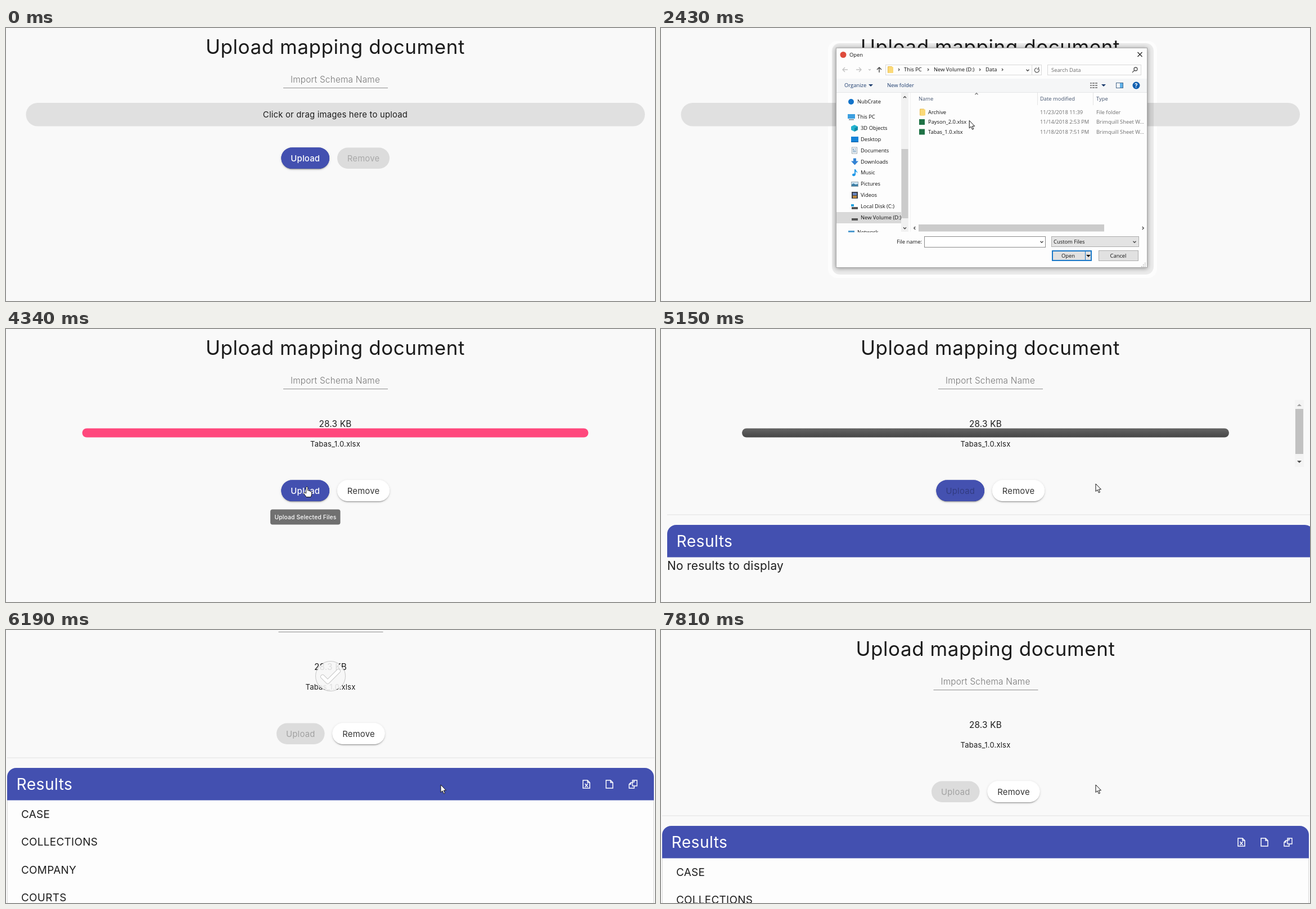
An HTML page with a canvas that plays this animation: 1154x485 px, repeating every 8000 ms.

```html
<!DOCTYPE html>
<html lang="en">
<head>
<meta charset="utf-8">
<title>Upload mapping document</title>
<style>
html, body { margin: 0; width: 100%; height: 100%; overflow: hidden; background: #f9f9f9; }
canvas { display: block; }
</style>
</head>
<body>
<canvas id="stage" width="1154" height="485"></canvas>
<script>
const LOOP = 8000;
const ctx = document.getElementById('stage').getContext('2d');
const BLUE = '#4350b0', GREY = '#dcdcdc', INK = '#1c1c1c';

// Time helpers: a smooth ramp, and one that advances in n visible jumps.
const ramp = (t, a, b) => Math.min(1, Math.max(0, (t - a) / (b - a)));
const steps = (t, a, b, n) => t < a ? 0 : Math.min(1, (Math.floor((t - a) / (b - a) * (n - 1)) + 1) / n);

// Drawing helpers
function fill(d, color) { ctx.fillStyle = color; ctx.fill(new Path2D(d)); }
function stroke(d, color, width = 1) {
  ctx.strokeStyle = color;
  ctx.lineWidth = width;
  ctx.stroke(new Path2D(d));
}
function box(x, y, w, h, color, r = 0) {
  ctx.fillStyle = color;
  ctx.beginPath();
  ctx.roundRect(x, y, w, h, r);
  ctx.fill();
}
function frame(x, y, w, h, color, width = 1) {
  ctx.strokeStyle = color;
  ctx.lineWidth = width;
  ctx.strokeRect(x + .5, y + .5, w - 1, h - 1);
}
function dot(x, y, r, color) { box(x - r, y - r, 2 * r, 2 * r, color, r); }
function text(s, x, y, size, color = INK, weight = 400, align = 'left') {
  ctx.font = `${weight} ${size}px Inter, sans-serif`;
  ctx.letterSpacing = size * .016 + 'px';
  ctx.textAlign = align;
  ctx.fillStyle = color;
  ctx.fillText(s, x, y);
}
// Small dialog label, placed by its vertical middle.
function label(s, x, y, color = '#111', align = 'left') {
  ctx.font = '9.4px "Open Sans", sans-serif';
  ctx.letterSpacing = '0px';
  ctx.textAlign = align;
  ctx.fillStyle = color;
  ctx.fillText(s, x, y + 3.4);
}
function at(x, y, draw) {
  ctx.save();
  ctx.translate(x, y);
  draw();
  ctx.restore();
}
function faded(alpha, draw) {
  ctx.save();
  ctx.globalAlpha *= alpha;
  draw();
  ctx.restore();
}
function raised(blur, dy, color, draw) {
  ctx.save();
  Object.assign(ctx, { shadowBlur: blur, shadowOffsetY: dy, shadowColor: color });
  draw();
  ctx.restore();
}
const chevron = (x, y, turn, color = '#444', size = 2.5) => at(x, y, () => {
  ctx.rotate(turn * Math.PI / 2);
  stroke(`M${-size} ${size / 2}L0 ${-size / 2}L${size} ${size / 2}`, color, 1.3);
});

// Main page
function pill(x, y, w, color, lifted) {
  const draw = () => box(x, y, w, 37.5, color, 18.75);
  if (lifted) {
    raised(5, 1, 'rgba(0,0,0,.12)', draw);
    raised(2, 2, 'rgba(0,0,0,.14)', draw);
    raised(1, 3, 'rgba(0,0,0,.2)', () => box(x + 2, y + 2, w - 4, 33.5, color, 16.75));
  }
  draw();
}
const caption = (s, x, y, color, weight) => text(s, x, y + 24, 14.8, color, weight, 'center');

function progressBar(t, cx) {
  const pulse = 1 + .1 * Math.sin(Math.PI * ramp(t, 3480, 4340));
  const w = t < 5150 ? 900 : 866;
  faded(1 - ramp(t, 5150, 5600), () => at(cx, 184.5, () => {
    ctx.scale(pulse, pulse);
    if (t < 5150) box(-w / 2, -8, w, 16, '#ff487d', 8);
    const done = w * ramp(t, 4540, 4850);
    if (done) {
      const shade = ctx.createLinearGradient(0, -8, 0, 8);
      shade.addColorStop(0, '#646464');
      shade.addColorStop(1, '#464646');
      box(-w / 2, -8, done, 16, shade, 8);
    }
  }));
}

function checkMark(t) {
  const enter = ramp(t, 5400, 5890), leave = ramp(t, 7180, 7510);
  faded(enter * (1 - leave), () => at(577, 185 + 40 * (1 - enter - leave), () => {
    const tick = 'M-14 1L-5 10L14 -9';
    dot(0, 0, 27, 'rgba(0,0,0,.2)');
    dot(0, 0, 26, 'rgba(255,255,255,.85)');
    ctx.lineCap = ctx.lineJoin = 'round';
    stroke(tick, '#c8c8c8', 8);
    stroke(tick, '#fff', 6);
  }));
}

function innerScrollbar() {
  box(1127, 126, 16, 119, '#f4f4f4');
  box(1128, 142, 14, 80, '#c1c1c1');
  fill('M1131 137h8l-4-4z', '#a3a3a3');
  fill('M1131 234h8l-4 4z', '#505050');
}

function results(t) {
  const listed = t >= 5980, x = listed ? 2 : 11;
  box(x, 329.5, 1151, 1, '#e2e2e2');
  if (listed) {
    box(2, 400, 1150, 330, '#dcdcdc');
    box(3, 400, 1148, 330, '#fdfdfd');
    ['CASE', 'COLLECTIONS', 'COMPANY', 'COURTS', 'DEBTOR_PAYMENTS', 'DOCUMENTS']
      .forEach((name, i) => text(name, 27, 436.5 + i * 49.6, 18.9));
  } else {
    text('No results to display', 11, 428, 20.8);
  }
  box(x, 348, 1150, 57.5, BLUE, [16, 16, 0, 0]);
  text('Results', x + 16.5, 387, 28.2, '#fff');
  if (!listed) return;
  const page = 'M-6-7H2L6-3V7H-6ZM2-7V-3H6';
  at(1032, 377, () => { stroke(page, '#fff', 1.5); stroke('M-2.5-1L2.5 5M2.5-1L-2.5 5', '#fff', 1.5); });
  at(1073, 377, () => stroke(page, '#fff', 1.5));
  at(1115, 377, () => stroke('M-1-7H7V3H-1V-4ZM-1-4H2V-7M-1-3H-4L-7 0V7H2V3M-7 0H-4V-3', '#fff', 1.4));
}

function page(t) {
  const picked = t >= 3480, sent = t >= 5150;
  const cx = t >= 5980 ? 577 : 585.5, left = cx - 585.5;
  const y = picked ? 268.5 : 212.5;

  if (!picked) {
    box(35.5, 133, 1100.5, 41.5, '#e0e0e0', 20.75);
    text('Click or drag images here to upload', cx, 159, 14.8, INK, 400, 'center');
  }
  text('Upload mapping document', cx, 46, 35, INK, 400, 'center');
  text('Import Schema Name', cx, 97, 15.3, '#757575', 300, 'center');
  box(cx - 92.5, 106, 186, 1, '#8e8e8e');

  if (picked) {
    const fileX = sent ? 577 : 585.5;
    progressBar(t, fileX);
    text('28.3 KB', fileX, 174, 15.3, INK, 400, 'center');
    text('Tabas_1.0.xlsx', fileX, 208.5, 13, INK, 400, 'center');
    if (sent && t < 5980) innerScrollbar();
  }

  const upload = 489.5 + left, off = ramp(t, 5150, 5600);
  if (off < 1) pill(upload, y, 85.5, BLUE, true);
  if (off) faded(off, () => pill(upload, y, 85.5, GREY));
  caption('Upload', upload + 42.75, y, sent ? 'rgba(0,0,0,.27)' : '#fff', sent ? 400 : 500);
  pill(589 + left, y, 93, picked ? '#fff' : GREY, picked);
  caption('Remove', 635.5 + left, y, picked ? '#333' : '#a8a8a8', 400);

  faded(ramp(t, 4200, 4330) * (1 - ramp(t, 4480, 4630)), () => {
    box(470, 320.5, 124.5, 27, '#707070', 4);
    text('Upload Selected Files', 532.5, 338, 10.3, '#fff', 500, 'center');
  });
  if (sent) results(t);
  checkMark(t);
}

// File dialog: side bar entries are name, x, y and [path, colour] pairs.
const disk = ['M-5 1h11v4h-11z', '#555'];
const places = [
  ['NubCrate', 349, 131, ['M-5 0a5 5 0 1 0 10 0a5 5 0 1 0-10 0z', '#1273c9']],
  ['This PC', 349, 158, ['M-6-5h13v8h-13z', '#3c9fe0'], ['M-4 4h9v1.5h-9z', '#6d7a85']],
  ['3D Objects', 355, 178, ['M0-6L6-3V3L0 6L-6 3V-3z', '#25b3cf'], ['M0 0L6-3V3L0 6z', '#128ba8']],
  ['Desktop', 355, 198, ['M-6-5h13v9h-13z', '#1583d8'], ['M-6 4h13v1h-13z', '#0a5b9f']],
  ['Documents', 355, 217.5, ['M-5-6h10v12h-10z', '#9aa7b0'], ['M-4-5h8v10h-8z', '#fff'], ['M-3-3h2v2h-2zM0-3h3v1h-3zM-3 0h6v1h-6zM-3 2h6v1h-6z', '#5b87ad']],
  ['Downloads', 355, 237.5, ['M-2-6h5v5h4l-6.5 7l-6.5-7h4z', '#3383d4']],
  ['Music', 355, 257, ['M0-6h2c0 3 4 3 3 7c-1-2-2-3-3-3v5c0 4-6 4-6 1c0-2 2-3 4-2z', '#2098e8']],
  ['Pictures', 355, 277, ['M-6-4h13v9h-13z', '#9aa7b0'], ['M-5-3h11v7h-11z', '#cfe7f7'], ['M-5 4v-3l3-2l4 2l4-1v4z', '#3f7fa5']],
  ['Videos', 355, 297, ['M-5-6h11v12h-11z', '#3a3f4a'], ['M-3-4h7v4h-7z', '#6a86c0'], ['M-3 1h7v4h-7z', '#c18b3c']],
  ['Local Disk (C:)', 355, 317, disk, ['M-6-4h5v4h-5z', '#23a3e0']],
  ['New Volume (D:)', 355, 337, disk],
  ['Network', 349, 363, ['M-5-3h11v7h-11z', '#4f9bd0']],
];
const folder = (x, y) => {
  box(x - 5, y - 6, 8, 12, '#e8bd52', 1);
  box(x - 4, y - 5, 9, 11, '#fbd978', 1);
};

function sidebar() {
  ctx.save();
  ctx.beginPath();
  ctx.rect(312, 115, 115, 248);
  ctx.clip();
  box(312, 327, 115, 20, '#d9d9d9');
  for (const [name, x, y, ...icon] of places) {
    at(x - 11, y, () => icon.forEach(part => fill(...part)));
    label(name, x, y);
  }
  ctx.restore();
}

function toolbar() {
  const arrow = (x, turn, color) => at(x, 74, () => {
    ctx.rotate(turn * Math.PI / 2);
    stroke('M0 5V-4M-4 0L0-4L4 0', color, 1.4);
  });
  arrow(327, -1, '#c4c4c4');
  arrow(352, 1, '#c4c4c4');
  arrow(388, 0, '#444');
  chevron(371, 74, 2, '#bbb', 1.8);
  frame(399, 65, 278, 19, '#d9d9d9');
  box(659, 66, 1, 17, '#d9d9d9');
  folder(408, 74);
  [['This PC', 432], ['New Volume (D:)', 485], ['Data', 577]].forEach(([s, x]) => label(s, x, 74));
  [423, 475, 567, 607].forEach(x => chevron(x, 74, 1, '#555', 2));
  chevron(652, 75, 2);
  stroke('M671.5 72.5A4 4 0 1 1 668 71M671.5 69.5V73H668', '#555', 1.2);
  frame(687, 65, 167, 19, '#d9d9d9');
  label('Search Data', 694, 74.5, '#6d6d6d');
  stroke('M838 79L841.5 75.5M847 73A3 3 0 1 1 841 73A3 3 0 1 1 847 73', '#555', 1.3);

  box(312, 90, 552, 25, '#f5f6f7');
  box(312, 114, 552, 1, '#e4e6e8');
  label('Organize', 326, 102, '#1c3c6e');
  fill('M369 100h8l-4 4z', '#1c3c6e');
  label('New folder', 402, 102, '#1c3c6e');
  for (let i = 0; i < 3; i++) {
    box(763, 97 + i * 4, 3, 2, '#8a8a8a');
    box(767, 97 + i * 4, 4, 2, '#8a8a8a');
    box(772, 97 + i * 4, 4, 2, '#8a8a8a');
  }
  fill('M783 100h8l-4 4z', '#1c3c6e');
  frame(809, 97, 13, 10, '#466a8e');
  box(816, 98, 5, 8, '#5fb0e8');
  dot(845, 102, 6.5, '#0f5fb0');
  text('?', 845, 105.5, 10, '#fff', 700, 'center');
}

function fileList(t) {
  box(443, 115, 1, 247, '#f0f0f0');
  chevron(561, 117, 0, '#777');
  [['Name', 458], ['Date modified', 674], ['Type', 774]].forEach(([s, x]) => label(s, x, 126, '#44546f'));
  box(669, 115, 1, 22, '#e4e4e4');
  box(768, 115, 1, 22, '#e4e4e4');

  if (t >= 2450 && t < 2640) box(456, 158, 408, 18, '#e5f3ff');
  if (t >= 2640) box(456, 176, 408, 17.5, t < 2850 ? '#e5f3ff' : '#cce8ff');
  if (t >= 2850) frame(456, 176, 408, 17.5, '#99d1ff');
  [
    ['Archive', '11/23/2018 11:39', 'File folder'],
    ['Payson_2.0.xlsx', '11/14/2018 2:53 PM', 'Brimquill Sheet W...'],
    ['Tabas_1.0.xlsx', '11/18/2018 7:51 PM', 'Brimquill Sheet W...'],
  ].forEach(([name, date, type], i) => {
    const y = 149.5 + i * 17.5;
    i ? box(459, y - 5, 10, 10, '#1f7246') : folder(465, y);
    label(name, 475, y);
    label(date, 674, y, '#6d6d6d');
    label(type, 774, y, '#6d6d6d');
  });
  chevron(451, 355.5, -1);
  chevron(857, 355.5, 1);
}

function footer(t) {
  label('File name:', 464, 380, '#111', 'right');
  box(468, 370, 216, 20, '#fff');
  frame(468, 370, 216, 20, '#8a8a8a');
  if (t >= 3180) label('Tabas_1.0.xlsx', 471, 380.5);
  chevron(677, 380, 2);
  box(694, 370, 156, 19, '#e3e3e3');
  frame(694, 370, 156, 19, '#adadad');
  label('Custom Files', 698, 380);
  chevron(842, 380, 2);
  box(695, 395, 71, 19, '#e1e1e1');
  frame(695.5, 395.5, 70, 18, '#1a78c8', 2);
  box(754, 397, 1, 15, '#1a78c8');
  label('Open', 724, 405, '#111', 'center');
  fill('M756 403h8l-4 4z', '#111');
  box(778, 395, 71, 19, '#e1e1e1');
  frame(778, 395, 71, 19, '#adadad');
  label('Cancel', 813, 405, '#111', 'center');
  for (let i = 0; i < 3; i++)
    for (let j = 0; j <= i; j++) box(860 - j * 3, 417 + i * 3, 1.6, 1.6, '#b5b5b5');
}

function dialog(t) {
  const loaded = t >= 1830, listed = t >= 1900;
  box(304, 27, 572, 411, 'rgba(0,0,0,.07)', 14);
  raised(8, 1, 'rgba(0,0,0,.4)', () => box(311, 35, 554, 391, '#a9a9a9'));
  box(312, 36, 552, 389, '#fdfdfd');
  dot(324, 47.5, 5.5, '#de4b3c');
  label('Open', 335, 48);
  stroke('M847.5 43L855.5 51M855.5 43L847.5 51', '#222', 1.2);

  if (loaded) { toolbar(); footer(t); }
  if (listed) {
    sidebar();
    fileList(t);
    box(427, 115, 13, 247, '#f1f1f1');
  }
  box(427.5, listed ? 215 : 129, 12, listed ? 123 : 213.5, '#cbcbcb');
  box(458, 349, 330, 12.5, '#cbcbcb');
  chevron(433.5, 123, 0);
  chevron(433.5, 355.5, 2);
}

// Pointer: each move is start, end, jumps and the spot it reaches.
const moves = [
  [200, 930, 11, 612, 152],
  [2000, 2550, 9, 530, 168],
  [2640, 2641, 1, 472, 185.5],
  [3550, 4200, 10, 535, 280],
  [4480, 4920, 7, 773, 275],
];
function pointer(t) {
  if (t < 200) return;
  let x = 952, y = 375;
  for (const [a, b, n, toX, toY] of moves) {
    // Blend from the previous spot by the share of this move done.
    const p = steps(t, a, b, n);
    x += (toX - x) * p;
    y += (toY - y) * p;
  }
  const hand = t < 1550 ? y < 175 : t > 3480 && x < 575 && y >= 269;
  const shape = hand
    ? 'M-1.5 2C-1.5-.5 1.5-.5 1.5 2V7C2.5 6 4 6.3 4 8C5 7 6.5 7.3 6.5 9C7.5 8.3 8.5 8.8 8.5 10V14L7 18.5H-1L-5 13C-6.5 10.5-4 9.5-1.5 12Z'
    : 'M0 0V13.5L3.1 10.7L5.4 15.8L7.5 14.9L5.3 9.9H9.5Z';
  at(x, y, () => { fill(shape, '#fff'); stroke(shape, '#111'); });
}

function draw(t) {
  const scroll = 103 * (steps(t, 5980, 6190, 3) + steps(t, 6880, 7030, 3)) - 206 * steps(t, 7660, 7810, 3);
  const open = t >= 1750 && t < 3330;
  box(0, 0, 1154, 485, '#f9f9f9');
  if (open) box(297, 23, 585, 421, '#fdfdfd', 16);
  at(0, -scroll, () => page(t));
  if (open) dialog(t);
  pointer(t);
}

const start = performance.now();
function tick() {
  draw((performance.now() - start) % LOOP);
  requestAnimationFrame(tick);
}
tick();
</script>
</body>
</html>
```
